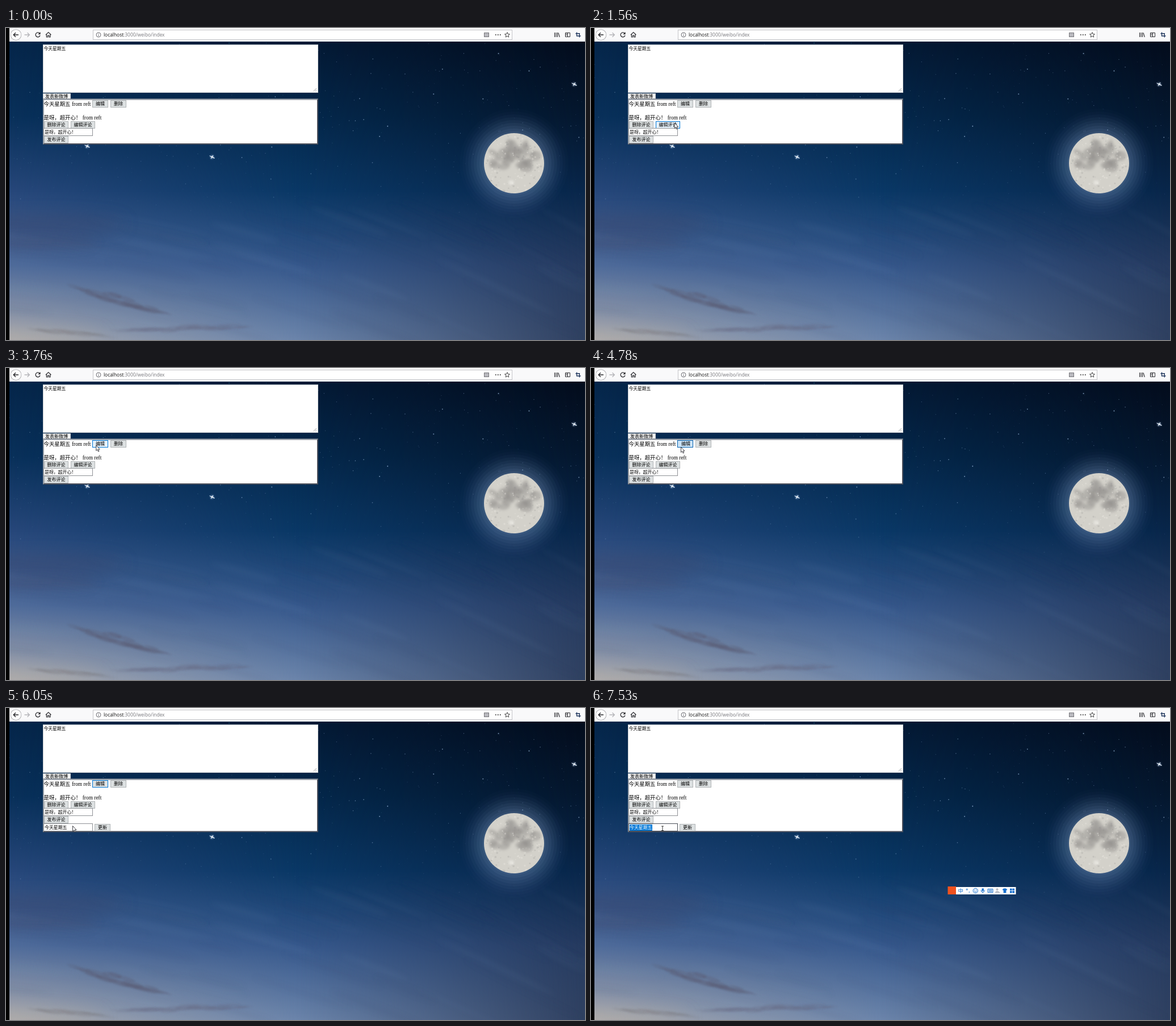
Write an HTML page with a canvas that moves like this. It is 1020 px wide and 549 px high and loops after 8000 ms.

```html
<!DOCTYPE html>
<html lang="zh-CN">
<head>
<meta charset="utf-8">
<title>index</title>
<style>
html, body { margin: 0; width: 100%; height: 100%; overflow: hidden; background: #000; }
canvas { display: block; width: 100vw; height: 100vh; }
</style>
</head>
<body>
<canvas id="stage" width="1020" height="549"></canvas>
<script>
const W = 1020, H = 549, LOOP = 8000, BAR = 24;
const CJK = '"Noto Sans CJK SC", "Noto Sans CJK", sans-serif';
const SERIF = '"Liberation Serif", "Noto Sans CJK SC", serif';
const UI = '"Open Sans", sans-serif';
let c = document.getElementById('stage').getContext('2d');

// ---------- helpers ----------
function layer(paint) {
  const el = document.createElement('canvas'), keep = c;
  el.width = W; el.height = H;
  c = el.getContext('2d');
  paint();
  c = keep;
  return el;
}
function rect(x, y, w, h, fill) { c.fillStyle = fill; c.fillRect(x, y, w, h); }
function box(x, y, w, h, fill, edge) {
  rect(x, y, w, h, edge);
  rect(x + 1, y + 1, w - 2, h - 2, fill);
}
function text(s, x, y, size, fill = '#000', family = CJK) {
  c.font = size + 'px ' + family;
  c.fillStyle = fill;
  c.fillText(s, x, y);
}
function disc(x, y, r, fill) {
  c.fillStyle = fill;
  c.beginPath(); c.arc(x, y, r, 0, 7); c.fill();
}
function ring(x, y, r, color) {
  c.strokeStyle = color; c.lineWidth = 1;
  c.beginPath(); c.arc(x, y, r, 0, 7); c.stroke();
}
function blob(x, y, rx, ry, turn, fill, blur) {
  c.filter = 'blur(' + blur + 'px)';
  c.fillStyle = fill;
  c.beginPath(); c.ellipse(x, y, rx, ry, turn, 0, 7); c.fill();
  c.filter = 'none';
}
function line(d, color, width = 1) {
  c.strokeStyle = color; c.lineWidth = width;
  c.stroke(new Path2D(d));
}
function shape(d, fill) { c.fillStyle = fill; c.fill(new Path2D(d)); }
function random(seed) {
  return () => {
    seed = seed + 0x6D2B79F5 | 0;
    let t = Math.imul(seed ^ seed >>> 15, 1 | seed);
    t = t + Math.imul(t ^ t >>> 7, 61 | t) ^ t;
    return ((t ^ t >>> 14) >>> 0) / 4294967296;
  };
}

// ---------- night sky ----------
function spread(gradient, colors) {
  colors.forEach((col, i) => gradient.addColorStop(i / (colors.length - 1), col));
  return gradient;
}
// A vertical blend that is strongest at one side and gone at the middle.
function side(colors, mask) {
  return layer(() => {
    rect(0, 0, W, H, spread(c.createLinearGradient(0, BAR, 0, H), colors));
    c.globalCompositeOperation = 'destination-in';
    rect(0, 0, W, H, spread(c.createLinearGradient(0, 0, W, 0), mask));
  });
}
function gradients() {
  const on = '#000', off = 'transparent';
  const left = ['#05264a', '#08305a', '#27477a', '#4f6b9a', '#a9a9ae'];
  const mid = ['#041a36', '#04284c', '#0a3866', '#36588c', '#6c85ab'];
  const right = ['#030c1c', '#04172e', '#08264a', '#263b60', '#2f4060'];
  c.drawImage(side(mid, [on, on]), 0, 0);
  c.drawImage(side(left, [on, off, off]), 0, 0);
  c.drawImage(side(right, [off, off, on]), 0, 0);
}
// Soft flecks strung along a line, thickest in the middle.
function wisp(x0, y0, x1, y1, thick, color, seed) {
  const rnd = random(seed), turn = Math.atan2(y1 - y0, x1 - x0);
  for (let k = 0; k <= 1; k += .04) {
    const body = thick * Math.sin(Math.PI * (.1 + .85 * k));
    const y = y0 + (y1 - y0) * k + (rnd() - .5) * body * 2;
    blob(x0 + (x1 - x0) * k, y, 12 + rnd() * 12, body * (.3 + rnd() * .5), turn, color, 1.5);
  }
}
function clouds() {
  const rnd = random(5);
  for (let i = 0; i < 60; i++) {
    const x = rnd() * W, y = 340 + rnd() * 200;
    blob(x, y, 40 + rnd() * 80, 2 + rnd() * 5, .1 + x / 2500,
      i % 2 ? 'rgba(140,165,205,.06)' : 'rgba(45,62,100,.07)', 5);
  }
  blob(60, 345, 150, 16, 0, 'rgba(62,62,92,.3)', 14);
  blob(60, 378, 100, 9, 0, 'rgba(70,66,94,.25)', 9);
  blob(20, 548, 150, 16, 0, 'rgba(192,180,160,.35)', 16);
  wisp(122, 457, 282, 502, 7, 'rgba(88,88,112,.26)', 3);
  wisp(205, 532, 430, 524, 6, 'rgba(102,102,126,.2)', 9);
  wisp(50, 530, 180, 543, 4, 'rgba(125,120,130,.18)', 12);
}
function brightStar(x, y) {
  blob(x, y, 3, 3, 0, 'rgba(180,210,245,.6)', 1.5);
  blob(x, y, 5.5, .7, .45, '#e4edfa', .5);
  blob(x, y, 4, .6, -1, '#e4edfa', .5);
  disc(x, y, 1.3, '#fff');
}
function stars() {
  const rnd = random(41);
  for (let i = 0; i < 480; i++) {
    const x = rnd() * W, y = BAR + rnd() * 310, glint = rnd() ** 8;
    const fade = Math.min(1, (345 - y) / 150);
    disc(x, y, .4 + rnd() * .3 + glint * .5, `rgba(165,195,230,${(.15 + rnd() * .25 + glint * .5) * fade})`);
  }
  brightStar(143, 208);
  brightStar(363, 227);
  brightStar(1001, 99);
}
function moon(x, y, r) {
  for (let i = 0; i < 9; i++)
    disc(x, y, r + 43 - i * 5, `rgba(140,163,203,${.012 + i * .009})`);
  c.save();
  c.beginPath(); c.arc(x, y, r, 0, 7); c.clip();
  rect(x - r, y - r, 2 * r, 2 * r, '#d3d1ca');
  const rnd = random(8);
  // Dark seas lie on an arc over the upper half.
  for (let i = 0; i < 26; i++) {
    const a = Math.PI * (.95 + 1.1 * i / 25), d = r * (.25 + .55 * rnd());
    blob(x + Math.cos(a) * d, y + 3 + Math.sin(a) * d, 5 + rnd() * 8, 4 + rnd() * 6, a, 'rgba(140,139,137,.42)', 2);
  }
  for (let i = 0; i < 140; i++) {
    const a = rnd() * 6.28, d = Math.sqrt(rnd()) * r;
    disc(x + Math.cos(a) * d, y + Math.sin(a) * d, .5 + rnd() * 1.5,
      i % 2 ? 'rgba(240,239,232,.3)' : 'rgba(130,130,128,.2)');
  }
  blob(x - 5, y + 34, 5, 4, 0, 'rgba(245,244,238,.6)', 2);
  c.restore();
}
function sky() {
  gradients();
  clouds();
  stars();
  moon(895, 238, 53);
}

// ---------- browser bar ----------
function toolbar() {
  const ink = '#2c2c30', dim = '#b4b4b8', gray = '#6a6a70';
  rect(0, 0, W, BAR, '#f9f9fa');
  rect(0, BAR - 1, W, 1, '#dcdce0');
  rect(0, 0, 6, H, '#000');
  disc(17.5, 12, 9.8, '#a9a9ad');
  disc(17.5, 12, 9, '#fdfdfd');
  line('M22 12H13.5M17 8.2L13.2 12L17 15.8', ink, 1.4);
  line('M32.5 12H41M37.6 8.2L41.4 12L37.6 15.8', dim, 1.3);
  line('M59.3 9.4A4 4 0 1 0 60 13', ink, 1.3);
  shape('M60.6 7V11.2H56.4Z', ink);
  line('M70 12L74.7 7.6L79.4 12M71.4 11.4V16H73.6V13H75.8V16H78V11.4', ink, 1.2);

  box(153, 3, 739, 18, '#fff', '#c3c3c7');
  ring(163, 12, 4, gray);
  line('M163 11.4V14.4M163 9.4V10.4', gray);
  text('localhost', 172, 15, 8.4, '#111', UI);
  text(':3000/weibo/index', 172 + c.measureText('localhost').width, 15, 8.4, '#77777c', UI);
  box(842, 8, 9, 8, '#b9b9be', '#77777c');
  for (let i = -1; i < 2; i++) disc(866.8 + i * 4, 12, 1.1, '#444');
  c.beginPath();
  for (let i = 0; i < 10; i++) {
    const a = i * Math.PI / 5 - Math.PI / 2, r = i % 2 ? 2.1 : 4.7;
    c.lineTo(883 + r * Math.cos(a), 12.3 + r * Math.sin(a));
  }
  c.closePath();
  c.strokeStyle = '#444'; c.lineWidth = 1; c.stroke();
  line('M966.5 8V16M969 8V16M971.5 8V16M973 8.3L975.3 16', ink, 1.1);
  line('M985.5 8.5H993.5V15.5H985.5ZM989.5 8.5V15.5M986.5 10.5H988.5M986.5 12.5H988.5', ink);
  line('M1005.5 7.5V14H1012.5M1003.5 9.7H1010.3V16.5', '#23395f', 1.4);
}

// ---------- page ----------
const POST = '今天星期五', COMMENT = '是呀，超开心！';
const SKINS = {
  idle: ['#dde1e2', '#b0b4b6'], hot: ['#e5f1fb', '#0078d7'],
  down: ['#cce4f7', '#0060b0'], focus: ['#dde1e2', '#0078d7']
};
function button(label, x, y, w, skin = 'idle') {
  const [fill, edge] = SKINS[skin];
  box(x, y, w, 13, fill, edge);
  text(label, x + (w - label.length * 8) / 2 + (skin === 'down' ? 1 : 0), y + 9.3, 8);
}
function field(value, y, focused, selected) {
  box(66, y, 87, 14, '#fff', focused ? '#4a4f58' : '#8f9296');
  if (selected) rect(68, y + 2, 40, 11, '#0078d7');
  text(value, 68, y + 10.2, 7.9, selected ? '#fff' : '#000');
}
function entry(words, y) {
  text(words, 66.5, y, 9.4);
  text('from reft', 68.9 + words.length * 9.4, y, 9.4, '#000', SERIF);
}
function editor() {
  box(65, 29, 485, 85, '#fff', '#cdd0d3');
  text(POST, 66.4, 39.2, 7.8);
  line('M541.5 111.5L547 106M544.5 111.5L547 109', '#8d8d8d', .8);
  box(65, 115, 49, 10, '#f1f2f2', '#d0d3d5');
  text('发表新微博', 69, 123, 8);
}
function panel(t, mouse) {
  const open = t >= 4930, bottom = open ? 218.5 : 205;
  rect(65, 124.5, 485, bottom - 124.5, '#4c505c');
  shape(`M65 124.5H550L548 126.5H67V${bottom - 2}L65 ${bottom}Z`, '#98a0aa');
  rect(67, 126.5, 481, bottom - 128.5, '#fff');

  entry(POST, 136.8);
  const skin = t < 2260 ? 'idle' : t < 4200 ? 'hot' : t < 4930 ? 'down' : t < 7180 ? 'focus' : 'idle';
  button('编辑', 152, 127, 28, skin);
  button('删除', 184, 127, 28);
  entry(COMMENT, 161);
  const over = mouse && mouse[0] > 114 && mouse[0] < 157 && mouse[1] > 164 && mouse[1] < 177;
  button('删除评论', 67, 164, 43);
  button('编辑评论', 114, 164, 43, over ? 'hot' : 'idle');
  field(COMMENT, 176);
  button('发布评论', 67, 190, 43);
  if (open) {
    field(POST, 203, t >= 7180, t >= 7530);
    button('更新', 156, 204, 28);
  }
}

// ---------- input method bar ----------
function inputBar() {
  const blue = '#1770cf', pale = '#b9bcc4';
  rect(630, 315, 118.5, 13, '#fff');
  rect(628.5, 314, 14.5, 14, '#f0521f');
  text('中', 646.5, 325, 9.5, blue);
  ring(662.3, 319.3, 1.1, blue);
  text(',', 665, 324, 9, blue);
  ring(677.3, 321.5, 4.2, blue);
  line('M675 322.3Q677.3 325.2 679.6 322.3M675.8 319.5V321M678.8 319.5V321', blue);
  line('M690.2 317.5V322', blue, 3.4);
  line('M687 320.5Q687 324 690.2 324Q693.4 324 693.4 320.5M690.2 324V326', blue);
  line('M699 318.5H708V324.5H699ZM700.5 320.5H706.7M700.5 322.5H706.7', blue);
  disc(715.5, 319.2, 2, pale);
  shape('M711.8 325.5Q712 322 715.5 322Q719 322 721 325.5Z', pale);
  shape('M727 317.5H731L733.5 319.8L731.4 321V325.6H726.6V321L724.5 319.8Z', blue);
  for (let i = 0; i < 4; i++) rect(738 + i % 2 * 4.4, 317.6 + (i >> 1) * 4.4, 3.6, 3.6, blue);
}

// ---------- pointer ----------
// Rest points: time reached, x, y. Each leg slows down toward its end.
const RESTS = [
  [300, 822, 463], [920, 199.5, 185], [1600, 147, 167], [2260, 159, 133.5],
  [3390, 159, 133.5], [4780, 158.5, 139], [5310, 160.5, 142.5], [6050, 117.5, 207.5], [6950, 126, 211.5]
];
function pointerAt(t) {
  if (t < RESTS[0][0]) return null;
  const i = RESTS.findIndex(p => p[0] > t);
  if (i < 0) return RESTS[RESTS.length - 1].slice(1);
  const [t0, x0, y0] = RESTS[i - 1], [t1, x1, y1] = RESTS[i];
  const k = 1 - (1 - (t - t0) / (t1 - t0)) ** 2;
  return [x0 + (x1 - x0) * k, y0 + (y1 - y0) * k];
}
function pointer([x, y], beam) {
  c.save();
  c.translate(x, y);
  if (beam) {
    line('M-2 -3.5H2M0 -3.5V4M-2 4H2', '#222', .9);
  } else {
    const arrow = 'M0 0V9.4L2.2 7.5L3.7 11L5.2 10.3L3.7 7H6.5Z';
    shape(arrow, '#fff');
    line(arrow, '#15151c', .8);
  }
  c.restore();
}

// ---------- run ----------
const backdrop = layer(() => { sky(); toolbar(); editor(); });
const start = performance.now();

function draw(t) {
  const mouse = pointerAt(t);
  c.drawImage(backdrop, 0, 0);
  panel(t, mouse);
  if (t >= 6950) inputBar();
  if (mouse) pointer(mouse, t >= 6110);
}
function tick() {
  draw((performance.now() - start) % LOOP);
  requestAnimationFrame(tick);
}
tick();
</script>
</body>
</html>
```
